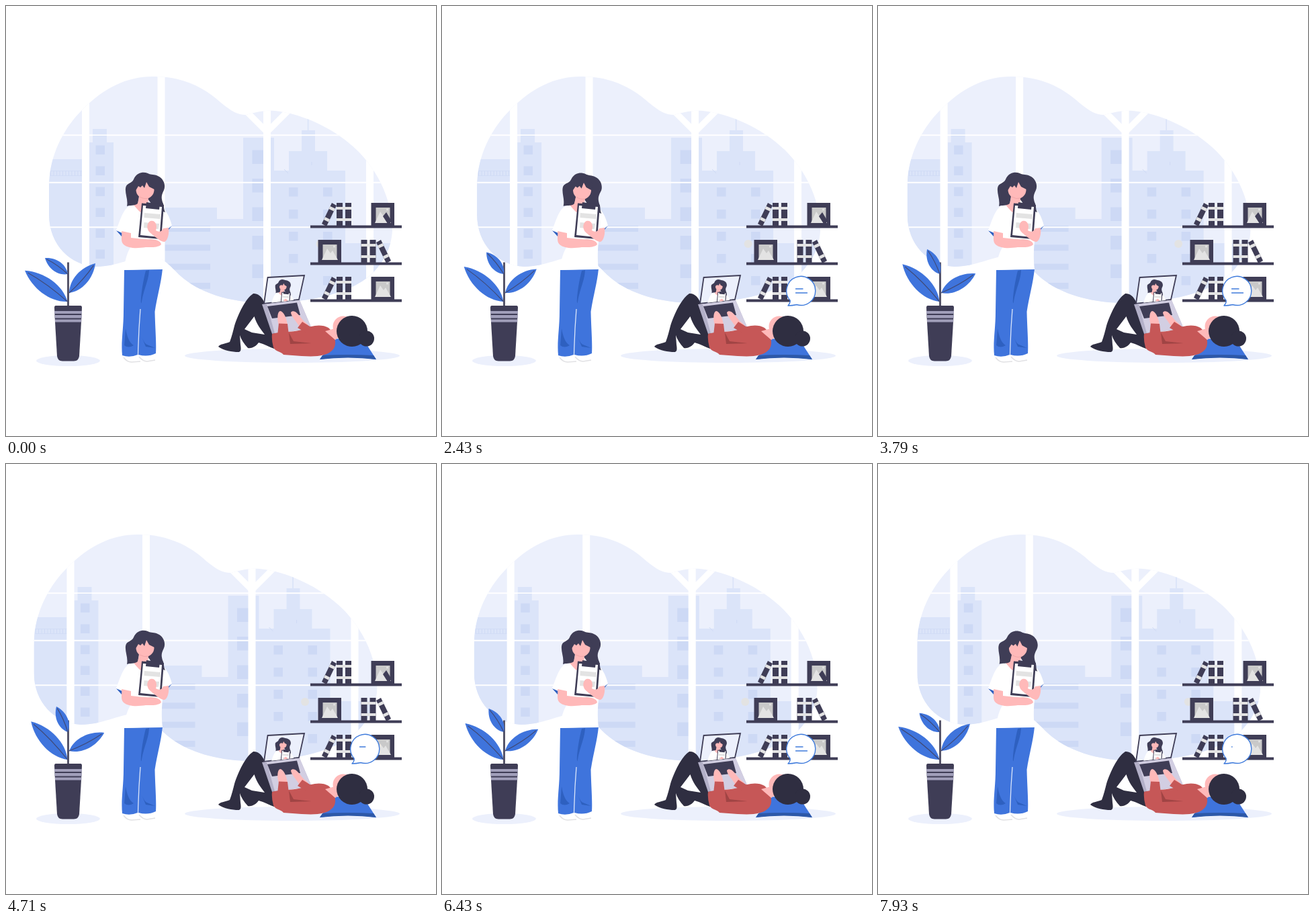
Animation of 640 by 640 pixels, one loop 8000 ms. Source, as an HTML page:

```html
<!DOCTYPE html>
<html lang="en">
<head>
<meta charset="utf-8">
<title>Remote meeting</title>
<style>
  html, body { margin: 0; height: 100%; overflow: hidden; background: #fff; }
  svg { display: block; width: 100%; height: 100%; }
  .dark { fill: #3f3d56; }
  .ink { fill: #2f2e41; }
  .blue { fill: #3f74dc; }
  .navy { fill: #2e60c0; }
  .skin { fill: #ffb9b9; }
  .red { fill: #c65757; }
  .white { fill: #fff; }
  .pale { fill: #ecf0fc; }
  .grey { fill: #e3e3e3; }
  .wall { fill: #dbe4f9; }
  .pane { fill: #cdd9f5; }
  .line { fill: none; stroke: #fff; }
</style>
</head>
<body>
<svg viewBox="0 0 640 640">
  <defs>
    <clipPath id="blob"><path d="M64 270C64 222 86 182 113 155C145 122 180 105 218 105C262 104 296 122 320 144C336 157 345 162 357 162C372 158 385 155 400 156C440 160 490 182 525 217C555 248 575 290 575 335C573 362 562 380 548 395C520 425 460 441 390 442C330 442 286 425 260 402C244 387 234 372 212 372C190 373 165 388 134 388C95 386 64 355 64 310Z"/></clipPath>
    <clipPath id="screen"><path d="M389.500 404L444 401L436 437L384 443Z"/></clipPath>

    <g id="shirt">
      <path class="navy" d="M164 334L173 344L173 337ZM240 331L247 327L242 333Z"/>
      <path class="white" d="M186 297C176 300 172 312 164 334L173 338L186 338L186 358C178 370 177 384 175 393L233 392C231 375 232 360 233 350L242 331L247 327C243 312 238 302 228 298C215 293 200 293 186 297Z"/>
      <path class="skin" d="M198 282L212 284L211 298L200 307C196 303 193 300 190 296C196 295 198 290 198 282Z"/>
    </g>
    <g id="head">
      <path class="dark" d="M180 298C182 288 177 280 178 271C179 263 187 265 190 258C194 248 204 246 211 249C217 252 220 250 226 253C235 257 238 267 235 274C231 282 231 285 233 292C236 298 234 301 237 307L222 302L211 287L198 284L196 294C191 298 184 296 180 298Z"/>
      <path class="skin" d="M198 278L212 282L211 298L200 303L194 297C197 294 198 289 198 278Z"/>
      <ellipse class="skin" cx="207" cy="273.500" rx="13.500" ry="13.500"/>
      <path d="M199 284Q206 288 212 286" fill="none" stroke="#eda3a5" stroke-width=".8"/>
      <path class="dark" d="M191 276L194 273L197 268L200 270L203 267L206 271L209 262L213 269L221 273L224 268L218 256L196 256L190 266Z"/>
    </g>
    <g id="arms">
      <path class="dark" d="M202 293.500L235 296L231 347L197 344Z"/>
      <path class="white" d="M204 297L232 299L228.500 344L200 341Z"/>
      <path class="dark" d="M209 292L229 295L228 303L208 301Z"/>
      <path class="grey" d="M206 308L230 310L229.500 317L205.500 315ZM205.500 322L228 324L227 332L205 330Z"/>
      <path class="skin" d="M172 335L186 338L186 345C198 346 208 348 215 347C225 347 231 351 231 355C226 360 215 359 208 359C195 361 182 361 175 355C170 350 173 343 172 335Z"/>
      <path class="skin" d="M242 330C243 338 241 349 236 351C230 351 221 343 214 337C208 331 210 322 215 320C222 318 226 326 223 334C228 337 232 336 234 331Z"/>
    </g>

    <g id="tilt">
      <path class="dark" d="M485 293L492 297L477 328L470 324Z"/>
      <path class="grey" d="M482.500 298L490 301.500L488 305.500L480.500 302ZM475 314L482 317.500L480 321.500L473 318Z"/>
    </g>
    <g id="pair">
      <path class="dark" d="M492 293h9v34h-9ZM505 293h9v34h-9Z"/>
      <path class="grey" d="M492 299h22v4h-22ZM492 316h22v4h-22Z"/>
    </g>
    <g id="frame">
      <path class="dark" d="M543.500 293H578V328H543.500Z"/>
      <path fill="#c9c9c9" d="M550.500 300H571.500V321H550.500Z"/>
      <path class="grey" d="M549 323L557 306L562 313L565 309L573 323Z"/>
      <circle class="grey" cx="567.500" cy="303" r="1.600"/>
    </g>
    <g id="row"><use href="#tilt"/><use href="#pair"/><use href="#frame"/></g>
    <path id="shelf" class="dark" d="M453 326.500H589V330.500H453Z"/>
  </defs>

  <g id="city">
    <g clip-path="url(#blob)">
      <path class="pale" d="M50 100H590V450H50Z"/>
      <path class="wall" d="M60 228H113V400H60ZM124 203H160V400H124ZM129 183H150V203H129ZM236 300H314V317H353V196H399V245H421V216H440V185H448.700V165H450.500V185H460V216H478V245H505V353H580V450H236Z"/>
      <path class="pane" d="M129 191H150V194H129Z"/>
      <path d="M66 249H113" stroke="#cfdaf5" stroke-width="7" stroke-dasharray="1 3.500"/>
      <path d="M66 245.500H113M66 252.500H113" stroke="#cfdaf5" stroke-width=".7"/>
      <path d="M414 243L420 249M455 232V237" stroke="#cfdaf5"/>
      <g id="panes" class="pane"></g>
      <path class="line" stroke-width="11" d="M118.500 100V400M231 100V400M388.500 150V450M541.500 190V450"/>
      <path class="line" stroke-width="9" d="M354 153L388 187M425 151L389 187"/>
      <path class="line" stroke-width="2" d="M60 192.300H580M60 262.800H580M60 329.300H580"/>
    </g>
    <circle class="grey" cx="467.500" cy="354" r="6"/>
  </g>

  <ellipse class="pale" cx="92.500" cy="528" rx="47.500" ry="8"/>
  <ellipse class="pale" cx="426" cy="520.500" rx="160" ry="10.500"/>

  <g id="plant">
    <path d="M92.500 381.500V447" stroke="#56556a" stroke-width="3"/>
    <g id="leaves"></g>
    <path class="dark" d="M74 446H111Q113 446 113 449L112 470L109 521Q108 528.500 101 528.500H84Q77 528.500 76 521L73 470L72 449Q72 446 74 446Z"/>
    <path fill="#a19fba" d="M72 454H113V458H72ZM72.500 460H112.700V464.500H72.500ZM73 466.500H112.300V470.500H73Z"/>
  </g>

  <use href="#shelf"/><use href="#shelf" y="55"/><use href="#shelf" y="110"/>
  <use href="#row"/><path class="dark" d="M561 313L566 307L572 317V324H568Z"/>
  <use href="#row" y="110"/>
  <use href="#frame" x="-79" y="55"/><use href="#pair" x="36.500" y="55"/>
  <use href="#tilt" transform="translate(1043 55) scale(-1 1)"/>

  <g id="woman">
    <path d="M175 523Q180 530 187 530L200 529M198 522Q204 529 210 529L222 527" fill="#fff" stroke="#e1e1e4" stroke-width="1.600"/>
    <path class="blue" d="M176 393L233 391C231 412 225 432 221.500 455C222 480 224 500 223 517Q211 523 197 519L196 515V519Q184 524 173 520C171 500 175 480 175 455Z"/>
    <path class="navy" d="M208 394L213 393C212 410 206 418 202 440C200 450 200 425 208 394ZM178 480C180 492 184 502 190 505Q182 510 176 505ZM200 488C204 498 207 503 210 504L222 509L208 507Z"/>
    <path d="M200 451C198 475 197 495 196.500 520" fill="none" stroke="#dce6fa" stroke-width="1.300"/>
    <use href="#shirt"/>
    <g id="turn"><use href="#head"/></g>
    <use href="#arms"/>
  </g>

  <g id="reader">
    <path class="ink" d="M368 428C377 427 383 436 386 445L402 490L399 510C392 508 385 503 376 501C372 507 365 510 360 509C354 503 350 496 348 490L349 504C350 510 350 515 346 515C336 515 322 512 316 507C318 503 326 503 333 500C336 492 338 484 340 476C346 458 356 436 368 428Z"/>
    <path class="white" d="M369.500 462C373 474 380 482 385 489L366 486L355 481Z"/>
    <path class="pale" stroke="#3f3d56" stroke-width="1.800" d="M389.500 404L444 401L436 437L384 443Z"/>
    <g clip-path="url(#screen)"><g transform="translate(329.500 308) scale(.4)">
      <use href="#shirt"/><use href="#head"/><use href="#arms"/>
    </g></g>
    <path fill="#b3b0c8" d="M381 444L437 438L455 480L396 488Z"/>
    <path fill="#d2cee2" d="M388 444L437 438L455 480L400 487Z"/>
    <path class="dark" d="M389 447L433 441.500L438 460L396 465Z"/>
    <path class="blue" fill-opacity="1" d="M467 526L490 495L533 498L551 526Q509 519 467 526Z"/>
    <path fill="#2d58a8" d="M467 526L471 520Q509 518 547 520L551 526Q509 521 467 526Z"/>
    <circle class="skin" cx="502" cy="477" r="15.500"/>
    <path class="red" d="M396 488C405 485 425 486 440 482C455 475 470 473 480 479C490 488 493 503 487 511C478 522 460 522 440 521L413 519C410 514 401 515 398 508Q395 497 396 488Z"/>
    <path fill="#a04444" d="M421 486L423 503L455 502L428 499Z"/>
    <path class="skin" d="M475 484L489 480L497 492L490 497Z"/>
    <path class="skin" d="M406 475C403 465 404 455 408 454C413 454 418 465 419 475ZM424 456C428 451 435 458 439 464C443 470 450 473 450 476L437 478C433 470 424 462 424 456Z"/>
    <path class="red" d="M404 490L406 472.500L419 473L421 490ZM434 479L441 470L454 478L448 487Z"/>
    <circle class="ink" cx="515" cy="484" r="23"/>
    <circle class="ink" cx="536.500" cy="495" r="11.500"/>
  </g>

  <g id="bubble" fill="none" stroke="#3f7bdc" stroke-width="1.400" stroke-linecap="round">
    <path class="white" stroke-linejoin="round" d="M515 446Q519 442 518 438A21.500 21.500 0 1 1 528 444.500Q521 446 515 446Z"/>
    <path id="line1"/><path id="line2"/>
  </g>
</svg>
<script>
const byId = id => document.getElementById(id);
const clamp = v => Math.max(0, Math.min(1, v));

const column = (x, y, w, h, step, count) => Array.from({ length: count }, (_, i) =>
  `<rect x="${x}" y="${y + i * step}" width="${w}" height="${h}"/>`).join('');
byId('panes').innerHTML =
  column(133.5, 207.5, 13.5, 13.5, 31, 6) +
  column(236, 327, 68, 9, 28.3, 4) +
  column(366.5, 214.5, 17, 20.5, 42.5, 5) +
  column(421, 270, 13.5, 13.5, 33, 4) +
  column(472, 270, 13.5, 13.5, 33, 5);

// Leaf: base point, length, half width, start angle, swing in degrees
const leaves = [
  [91.5, 440, 78.5, 11, -143.9, 10.2],
  [94, 427, 58.8, 9, -48.4, 21],
  [92, 399, 41.6, 7.5, -144.8, 30.7]
].map(([x, y, len, half, angle, swing]) => ({ x, y, len, w: half / .7, angle, swing }));
byId('leaves').innerHTML = leaves.map(({ len, w }) =>
  `<g><path class="blue" d="M0 0C${len * .25} ${-w} ${len * .68} ${-w} ${len} 0C${len * .68} ${w} ${len * .25} ${w} 0 0Z"/>
  <path fill="none" stroke="#3f4a78" stroke-width="1.200" d="M0 0Q${len * .5} ${w * .25} ${len * .93} 0"/></g>`).join('');
const leafNodes = [...byId('leaves').children];

function nod(t, peak) {
  const u = clamp(Math.abs(t - peak) / 1700);
  return (1 + Math.cos(Math.PI * u)) / 2;
}

function backOut(u) {
  const k = 2.2, v = u - 1;
  return 1 + (k + 1) * v ** 3 + k * v ** 2;
}

function typeLine(id, y, length) {
  byId(id).setAttribute('d', length > 0 ? `M526.500 ${y}h${length}` : '');
}

function draw(t) {
  const sway = (1 - Math.cos(Math.PI * (t + 60) / 4800)) / 2;
  byId('city').setAttribute('transform', `translate(${-22.5 * sway} 0)`);
  leaves.forEach(({ x, y, angle, swing }, i) =>
    leafNodes[i].setAttribute('transform', `translate(${x} ${y}) rotate(${angle + swing * sway})`));

  const n = nod(t, 1620) + nod(t, 8780);
  byId('turn').setAttribute('transform', `translate(${n} ${n}) rotate(${4 * n} 200 300)`);

  const scale = backOut(clamp((t - 150) / 800));
  byId('bubble').setAttribute('transform', `translate(534 424) scale(${scale}) translate(-534 -424)`);

  const typed = t < 640 ? 0 : ((t - 640) % 3630) * .019;
  typeLine('line1', 421, Math.min(typed, 10.5));
  typeLine('line2', 427, Math.min(typed - 10.5, 17));
}

function tick() {
  draw(performance.now() % 8000);
  requestAnimationFrame(tick);
}
tick();
</script>
</body>
</html>
```
